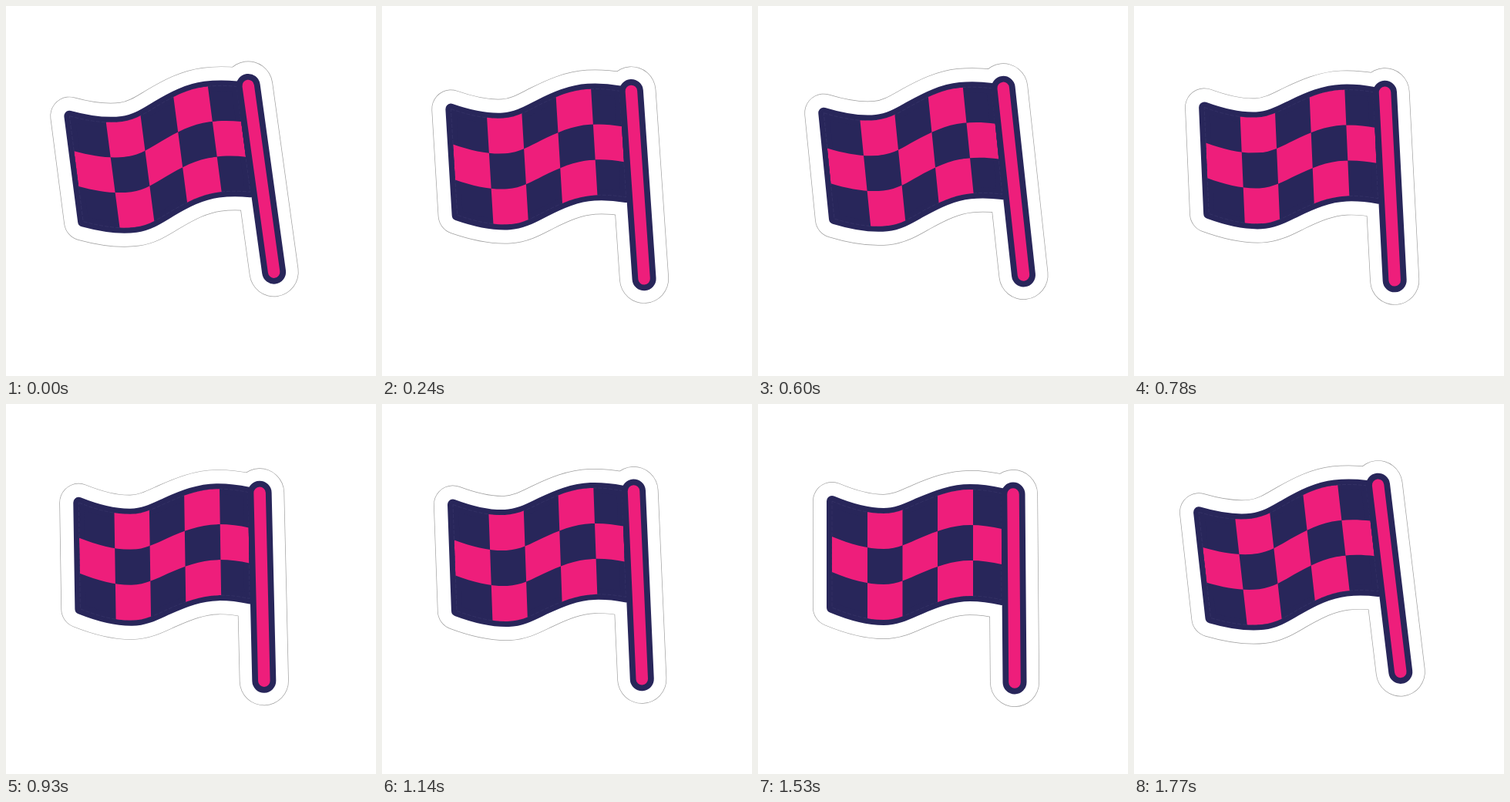
Recreate the animation shown at these times as an HTML page. Size 480 by 480 pixels, loop 1.8 s.

```html
<!DOCTYPE html>
<html lang="en">
<head>
<meta charset="utf-8">
<title>Waving flag sticker</title>
<style>
  html, body { margin: 0; width: 100%; height: 100%; overflow: hidden; background: #fff; }
  svg { display: block; width: 100%; height: 100%; }
  .shape { stroke-linejoin: round; stroke-linecap: round; }
  .edge { fill: #a0a0a0; stroke: #a0a0a0; }
  .paper { fill: #fff; stroke: #fff; }
  .navy { fill: #28265a; stroke: #28265a; }
  .pink { fill: #ee1e7b; }
  .seam { fill: none; stroke: #4a477a; stroke-width: .5; stroke-dasharray: 5 2; opacity: .6; }
</style>
</head>
<body>
<svg viewBox="0 0 480 480">
  <defs>
    <path id="cloth"/>
    <path id="pole" d="M331 117 L333 361"/>
    <clipPath id="band"><path id="strip"/></clipPath>
    <g id="pair" clip-path="url(#band)">
      <path d="M142 90h45.5v200h-45.5z M233 90h46v200h-46z"/>
    </g>
  </defs>
  <g id="flag">
    <g class="shape edge">
      <use href="#cloth" stroke-width="50"/>
      <use href="#pole" stroke-width="64"/>
    </g>
    <g class="shape paper">
      <use href="#cloth" stroke-width="48.6"/>
      <use href="#pole" stroke-width="62.6"/>
    </g>
    <g class="shape navy">
      <use href="#cloth" stroke-width="14"/>
    </g>
    <use class="seam" href="#cloth"/>
    <g class="pink">
      <use href="#pair" y="-46"/>
      <use href="#pair" y="46"/>
      <g clip-path="url(#band)">
        <path d="M96 90h46v200h-46z M187.5 90h45.5v200h-45.5z M279 90h37v200h-37z"/>
      </g>
    </g>
    <g class="shape">
      <use href="#pole" stroke="#28265a" stroke-width="31"/>
      <use href="#pole" stroke="#ee1e7b" stroke-width="15.5"/>
    </g>
  </g>
</svg>
<script>
  const $ = id => document.getElementById(id);

  // Bezier points of the cloth's wave line
  const wave = [
    [96, 172], [120, 182], [142, 188], [163, 188],
    [181, 188], [196, 180], [210, 174],
    [231, 165], [252, 157], [275, 157],
    [290, 157], [303, 159], [316, 162]
  ];
  const curve = (pts, dy) => {
    const [first, ...rest] = pts.map(([x, y]) => `${x} ${y + dy}`);
    return `${first} C${rest.join(' ')}`;
  };
  const ribbon = (top, bottom) =>
    `M${curve(wave, top)} L${curve([...wave].reverse(), bottom)} Z`;

  $('cloth').setAttribute('d', ribbon(-46, 92));
  $('strip').setAttribute('d', ribbon(0, 46));

  // Swing: [step, tilt in degrees], repeating every 60 steps of 30 ms
  const STEP = 30, STEPS = 60, REST = -0.5;
  const keys = [
    [0, -7.9], [2.5, -9], [8, -3.95], [11, 3], [15, -0.93],
    [20.5, -6.3], [26, -3], [32, -1.3], [38, -2.56],
    [44.5, -6.3], [51, -0.5], [54, 3], [59, -6.9]
  ];
  const key = i => {
    const n = keys.length, lap = Math.floor(i / n);
    const [s, a] = keys[i - lap * n];
    return [s + lap * STEPS, a];
  };
  const slope = i => {
    const [s0, a0] = key(i), [s1, a1] = key(i + 1);
    return (a1 - a0) / (s1 - s0);
  };
  // Flat at turning points, harmonic mean elsewhere
  const tangent = i => {
    const p = slope(i - 1), q = slope(i);
    return p * q > 0 ? 2 * p * q / (p + q) : 0;
  };
  const tilt = s => {
    let i = keys.length - 1;
    while (keys[i][0] > s) i--;
    const [s0, a0] = key(i), [s1, a1] = key(i + 1);
    const d = s1 - s0, u = (s - s0) / d, v = 1 - u;
    return a0 * v * v * (1 + 2 * u) + a1 * u * u * (3 - 2 * u)
      + d * u * v * (tangent(i) * v - tangent(i + 1) * u);
  };

  const start = performance.now();
  const draw = () => {
    const step = Math.floor((performance.now() - start) / STEP) % STEPS;
    $('flag').setAttribute('transform', `rotate(${tilt(step) - REST} 218 240)`);
    requestAnimationFrame(draw);
  };
  draw();
</script>
</body>
</html>
```
